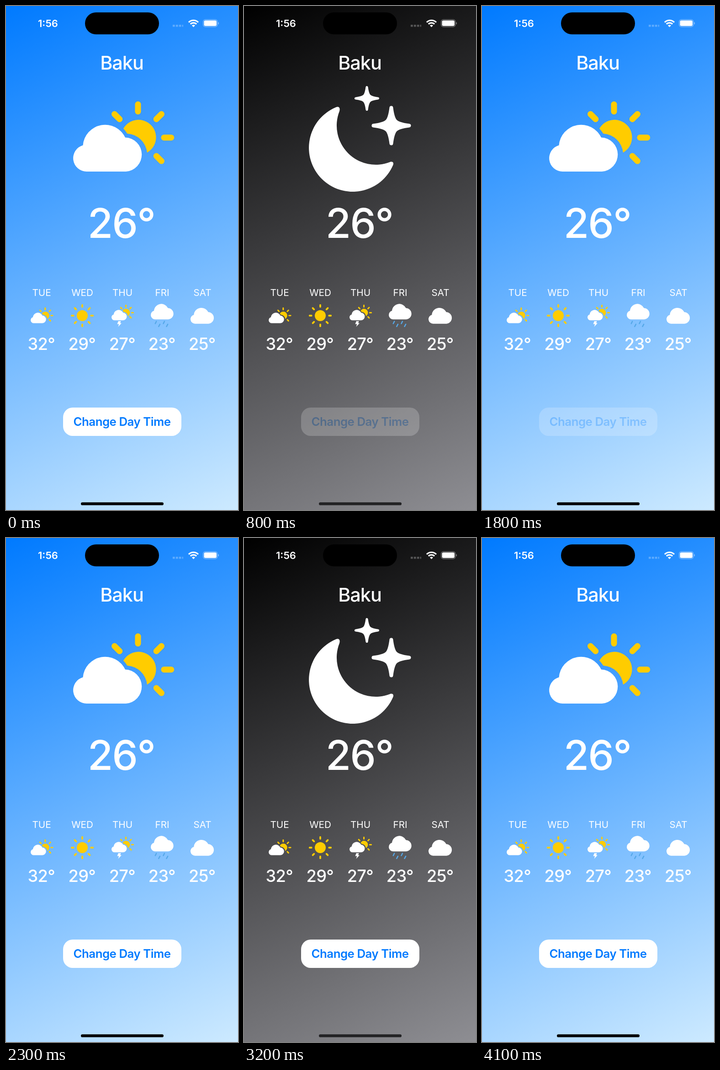
These frames come from a looping animation (508 by 1102 pixels, 4400 ms). An HTML page:

```html
<!DOCTYPE html>
<html lang="en">
<head>
<meta charset="utf-8">
<title>Weather</title>
<style>
  html, body { margin: 0; width: 100%; height: 100%; overflow: hidden; }
  body { background: linear-gradient(155.25deg, #007aff, #cdeaff); }
  body.night { background: linear-gradient(155.25deg, #000, #8e8e93); }
  svg { display: block; width: 508px; height: 1102px; font-family: Inter, sans-serif; }
  text { text-anchor: middle; fill: #fff; }
  .sun { fill: #fc0; }
  .rays { stroke: #fc0; stroke-linecap: round; }
  .white { fill: #fff; }
  .day-name { font-size: 20.7px; }
  .temp { font-size: 36.2px; font-weight: 500; letter-spacing: -.02em; }
  .night #home { fill: #222224; }
  #moon, .night #partly { display: none; }
  .night #moon { display: inline; }
</style>
</head>
<body>
<svg viewBox="0 0 508 1102">
  <defs>
    <path id="cloud" class="white" d="M177 362A29.3 29.3 0 0 1 168.5 304.5A48.7 48.7 0 0 1 261 287.5A37.3 37.3 0 0 1 262.5 362Z"/>
    <g id="cloud-sun">
      <path class="sun" d="M257 268A38.3 38.3 0 1 1 309 320.5A46.5 46.5 0 0 0 265.5 279A58 58 0 0 0 257 268Z"/>
      <g id="cloud-rays" class="rays" stroke-width="13"></g>
      <use href="#cloud"/>
    </g>
    <path id="star" class="white" stroke="#fff" stroke-width="8" stroke-linejoin="round"
      d="M0-39C4-8 8-4 39 0C8 4 4 8 0 39C-4 8-8 4-39 0C-8-4-4-8 0-39Z"/>
  </defs>

  <!-- Status bar -->
  <rect x="173" y="14" width="162" height="48" rx="24"/>
  <text x="92" y="46" font-size="22" font-weight="600">1:56</text>
  <path d="M367.4 43.3h23" stroke="#fff" stroke-opacity=".27" stroke-width="4.6" stroke-dasharray="4.8 2.1" transform="translate(-2.4)"/>
  <path d="M400 35.6A14.9 14.9 0 0 1 421 35.6M403.9 39.5A9.4 9.4 0 0 1 417.1 39.5" fill="none" stroke="#fff" stroke-width="3.2"/>
  <path class="white" d="M407 42.6A5 5 0 0 1 414 42.6L410.5 46.2Z"/>
  <rect x="431.6" y="29.6" width="31.4" height="16" rx="5" fill="none" stroke="#fff" stroke-opacity=".42" stroke-width="1.2"/>
  <rect class="white" x="433.5" y="31.4" width="27.6" height="12.4" rx="3.2"/>
  <path d="M464.4 35v5.4q1.8-.7 1.8-2.7t-1.8-2.7" fill="#fff" fill-opacity=".45"/>

  <text x="253.5" y="139" font-size="41.4" font-weight="500" letter-spacing="-1">Baku</text>
  <use id="partly" href="#cloud-sun"/>
  <g id="moon">
    <path class="white" d="M201 221.5A96 96 0 1 0 326.5 347.5C328.5 342 325 339.5 320 341A85.5 85.5 0 0 1 209 230C211 223 208 218.5 201 221.5Z"/>
    <use href="#star" transform="translate(322.5 261.5)"/>
    <use href="#star" transform="translate(269 202) scale(.63)"/>
  </g>
  <text x="252.5" y="507" font-size="90" font-weight="500" letter-spacing="-2">26°</text>

  <!-- Forecast -->
  <g id="forecast"></g>
  <use href="#cloud-sun" transform="translate(21.1 612.4) scale(.224)"/>
  <circle class="sun" cx="167" cy="677" r="12"/>
  <g id="sun-rays" class="rays" stroke-width="3.8"></g>
  <use href="#cloud-sun" transform="translate(198.4 606.8) scale(.222)"/>
  <path class="white" d="M246 689h5.5l-1.5 4.5h3l-7.5 8 2-6h-4Z"/>
  <use href="#cloud" transform="translate(268.3 565.4) scale(.331)"/>
  <path d="M329.3 689.5l-2.5 5M337 695.8l-2.7 5M347 689.5l-2.5 5M354.2 695.8l-2.7 5" stroke="#55a8e8" stroke-width="2.5" stroke-linecap="round"/>
  <use href="#cloud" transform="translate(354 571.6) scale(.34)"/>

  <g id="button">
    <rect class="white" x="125" y="878" width="259" height="62" rx="21"/>
    <text x="254" y="918" font-size="25.85" font-weight="600" letter-spacing="-.5" style="fill:#007aff">Change Day Time</text>
  </g>
  <rect id="home" x="164" y="1085.3" width="181" height="6.2" rx="3.1"/>
</svg>
<script>
  const LOOP = 4400, STEP = 100, FADE = 500;
  const taps = [800, 1800, 2700, 3600];
  const byId = id => document.getElementById(id);

  const rays = (cx, cy, inner, outer, from, count) =>
    Array.from({ length: count }, (_, i) =>
      `<path d="M${inner} 0H${outer}" transform="translate(${cx} ${cy}) rotate(${from + i * 45})"/>`).join('');
  byId('cloud-rays').innerHTML = rays(289, 287.7, 57, 72.7, -135, 5);
  byId('sun-rays').innerHTML = rays(167, 677, 19.3, 23.2, 0, 8);

  const forecast = [['TUE', 32, 78], ['WED', 29, 167], ['THU', 27, 255], ['FRI', 23, 342], ['SAT', 25, 430]];
  byId('forecast').innerHTML = forecast.map(([day, temp, x]) =>
    `<text class="day-name" x="${x}" y="634">${day}</text>
     <text class="temp" x="${x - .7}" y="752">${temp}°</text>`).join('');

  function draw() {
    const t = Math.floor(performance.now() % LOOP / STEP) * STEP;
    const past = taps.filter(tap => tap <= t);
    const p = past.length ? Math.min(1, (t - past.at(-1)) / FADE) : 1;
    document.body.classList.toggle('night', past.length % 2 === 1);
    byId('button').setAttribute('opacity', .2 + .8 * p * p * (3 - 2 * p));
    requestAnimationFrame(draw);
  }
  draw();
</script>
</body>
</html>
```
